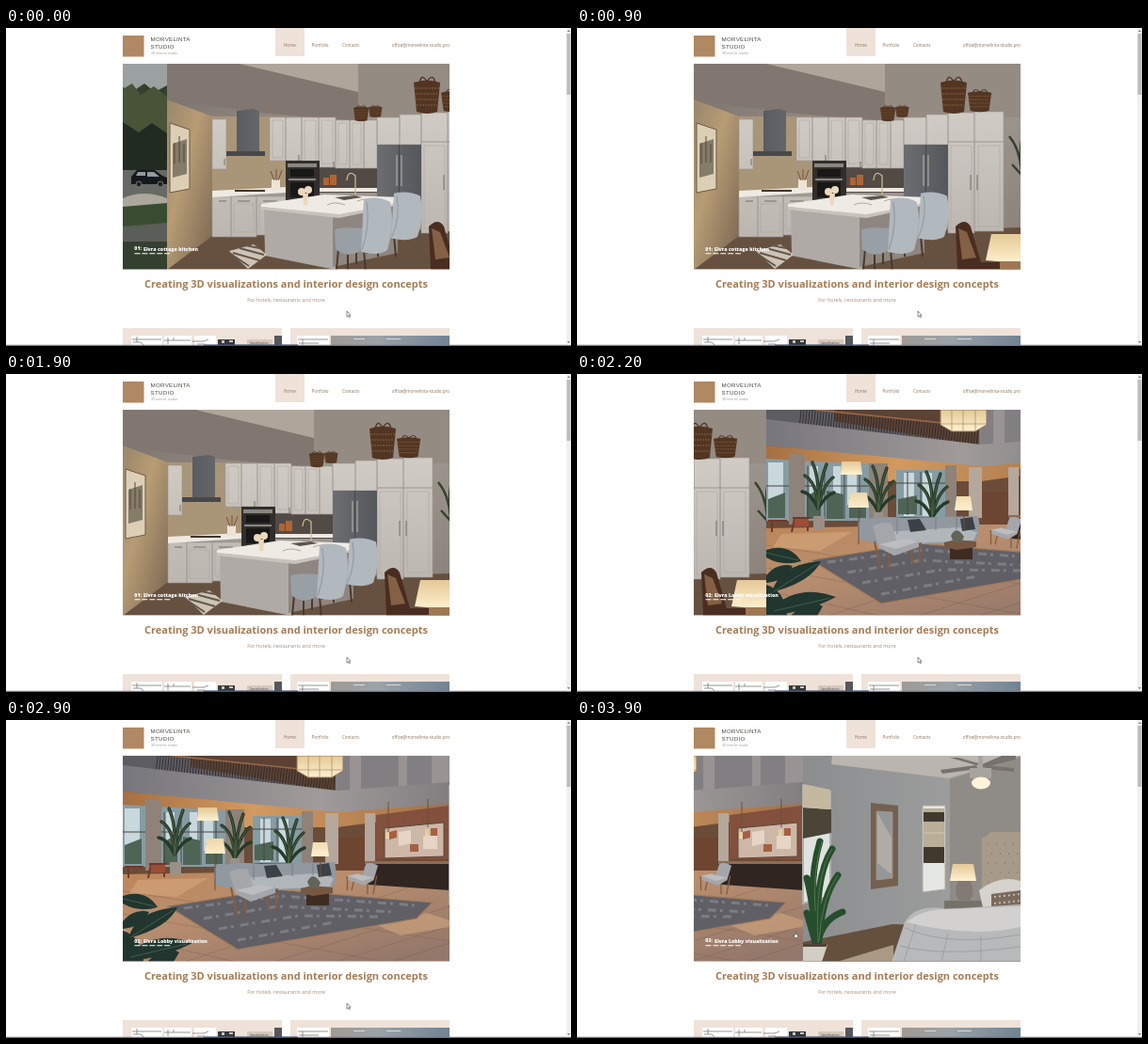
An HTML page for the animation above (4000 ms loop, 600 px wide and 338 px high).

```html
<!DOCTYPE html>
<html lang="en">
<head>
<meta charset="utf-8">
<title>Interior studio page</title>
<style>
  html, body { margin: 0; width: 100%; height: 100%; overflow: hidden; background: #fff; }
  svg { display: block; width: 100vw; height: 100vh; }
  text { font-family: "Open Sans", sans-serif; }
  .nav { font-size: 4.5px; fill: #8b735c; }
  .brand text { font: 6.2px "Liberation Sans", sans-serif; letter-spacing: .25px; fill: #4d4845; }
  .label { font-size: 5.3px; font-weight: 800; fill: #fff; }
</style>
</head>
<body>
<svg viewBox="0 0 600 338" preserveAspectRatio="none">
  <defs>
    <clipPath id="frame"><rect x="124" y="38" width="347" height="218.5"/></clipPath>
    <linearGradient id="wall" x2="1" y2="1"><stop stop-color="#756d67"/><stop offset=".5" stop-color="#a29b94"/><stop offset="1" stop-color="#867d75"/></linearGradient>
    <linearGradient id="warm" x2="1" y2="1"><stop stop-color="#9a866b"/><stop offset=".4" stop-color="#b79c74"/><stop offset="1" stop-color="#756350"/></linearGradient>
    <linearGradient id="cab" x2="0" y2="1"><stop stop-color="#d0cbc5"/><stop offset="1" stop-color="#bcb6b0"/></linearGradient>
    <linearGradient id="steel"><stop stop-color="#595c60"/><stop offset=".5" stop-color="#858789"/><stop offset="1" stop-color="#54575b"/></linearGradient>
    <linearGradient id="floor" x2=".8" y2="1"><stop stop-color="#bd8556"/><stop offset=".4" stop-color="#b98e6e"/><stop offset="1" stop-color="#94786b"/></linearGradient>
    <linearGradient id="fascia"><stop stop-color="#77767c"/><stop offset=".6" stop-color="#a09b9a"/><stop offset="1" stop-color="#827e80"/></linearGradient>
    <linearGradient id="soffit"><stop stop-color="#a66f42"/><stop offset=".4" stop-color="#d29a60"/><stop offset="1" stop-color="#a37048"/></linearGradient>
    <linearGradient id="paint"><stop stop-color="#8b8d8f"/><stop offset=".6" stop-color="#a2a2a1"/><stop offset="1" stop-color="#858380"/></linearGradient>
    <linearGradient id="glow" x2="0" y2="1"><stop stop-color="#e4c897"/><stop offset="1" stop-color="#fff1cf"/></linearGradient>
    <linearGradient id="ceil"><stop stop-color="#a09a94"/><stop offset=".4" stop-color="#9ba2a8"/><stop offset="1" stop-color="#718392"/></linearGradient>
    <g id="palm" fill="none" stroke="#263a2a" stroke-width="3.4" stroke-linecap="round">
      <path d="M0 42Q-1 15-14 7M0 42Q2 10-6-7M0 42Q2 12 9-5M0 42Q5 17 16 9M0 42Q-8 25-17 24M0 42Q9 27 17 25"/>
      <path stroke="#4d6040" stroke-width="1" d="M0 42Q-1 15-14 7M0 42Q2 10-6-7M0 42Q2 12 9-5M0 42Q5 17 16 9"/>
    </g>
    <g id="stool">
      <path stroke="#4d3827" stroke-width="2" d="M4 54L2 76M31 54L33 80M14 60V80M23 57V70"/>
      <path fill="#989fa5" d="M0 34Q4 30 30 32L31 54Q14 65 1 54Z"/>
      <path fill="#b1b8be" d="M31 1Q46-3 59 4Q64 29 56 55Q47 62 28 57Z"/>
      <path fill="none" stroke="#8c959d" d="M34 4Q38 30 29 55"/>
    </g>
    <g id="basket"><path fill="#523522" d="M0 6Q14 1 28 6L25 37Q14 41 3 37Z"/><path fill="none" stroke="#876141" stroke-dasharray="2 1" d="M1 12H27M2 18H26M2 24H26M3 30H25"/><path fill="none" stroke="#50331f" stroke-width="1.3" d="M6 7Q8-5 14 5Q21-5 23 7"/></g>
    <g id="seat"><path fill="none" stroke="#855c3c" stroke-width="2" d="M2 20L8 49M17 31L17 49M50 24V43M38 23L43 43M6 18L14 30L52 22"/><path fill="#a4a6aa" d="M0 4Q9-2 20 1L26 22L49 19V26L23 35L7 27Z"/><path fill="#bbbdc0" d="M7 23L33 17L49 20L25 28Z"/></g>
    <g id="fan" fill="#77726d"><path d="M426 52L388 57L386 53L424 48ZM430 51L466 42V38H451L428 48ZM424 48L396 40H405L430 47ZM433 52L464 55V51L434 48Z"/><path fill="#a7a39f" d="M426 38h5v13h-5zM417 51h23v11h-23z"/><ellipse cx="429" cy="67" rx="10" ry="6.5" fill="#fff4d9"/></g>
  </defs>
  <rect width="600" height="338" fill="#fff"/>

  <rect x="124" y="8" width="22.5" height="22.5" fill="#b08861"/>
  <g class="brand"><text x="153.6" y="14">MORVELINTA</text><text x="153.6" y="22">STUDIO</text></g>
  <text x="154" y="28.2" font-size="3.4" fill="#9a938c">3D interior studio</text>
  <rect x="286" width="31" height="30" fill="#efe2d9"/>
  <g class="nav">
    <text x="295" y="20.3">Home</text><text x="324.5" y="20.3">Portfolio</text><text x="357" y="20.3">Contacts</text>
    <text x="471" y="20.3" text-anchor="end">office@morvelinta-studio.pro</text>
  </g>

  <g clip-path="url(#frame)">
    <g id="track">
      <g transform="translate(-47)">
        <path fill="#34402f" d="M-176 38h347v219h-347z"/>
        <path fill="#9ba0a0" d="M124 38h47v23l-13 7-11-9-12 8-11-4z"/>
        <path fill="#485337" d="M124 65l10-6 9 12 14-9 14 11v70h-47z"/>
        <path fill="#222b22" d="M124 100l17 11 14-10 16 11v47h-47z"/>
        <path fill="#666964" d="M124 151h47v42h-47z"/>
        <path fill="#16191c" d="M133 158l6-7h19l8 6 5 2v7h-38z"/>
        <path fill="#929aa0" d="M140 153h8v4h-10zm10 0h7l6 5h-13z"/>
        <g fill="#202225" stroke="#777" stroke-width="1"><circle cx="141" cy="166" r="3"/><circle cx="164" cy="166" r="3"/></g>
        <path fill="#aba79a" d="M124 181q22-10 47 0v12h-47z"/><path fill="#384c32" d="M124 190l47-4v25l-47 7z"/><path fill="#5b5d58" d="M124 211l47-4v20h-47z"/>
      </g>

      <g clip-path="url(#frame)">
        <path fill="url(#wall)" d="M124 38h347v219H124z"/>
        <path fill="#817770" d="M124 38h77l126 29v32l-95-8-108-14z"/>
        <path fill="#afa59a" d="M201 38h126v30z"/><path fill="#948b83" d="M327 38h144v57H327z"/>
        <path fill="url(#warm)" d="M124 76l48 18v140l-48 23z"/>
        <path fill="#665140" d="M124 257l48-36 299-9v45z"/>
        <path fill="#dccfb6" stroke="#6b5946" d="M127 101l21 7v63l-21 4z"/><path fill="#857b69" d="M130 123l15-5v37l-15 4z"/><path stroke="#50483b" d="M132 144v-22m5 21v-28m5 28v-20"/>
        <path fill="#a99578" d="M172 94h78v79h-78z"/><path fill="#514a45" d="M286 145h62v30h-62z"/>
        <path fill="url(#cab)" stroke="#9b9691" stroke-width=".6" d="M172 97h15v53h-15zM233 95h17v46h-17zM250 95h17v46h-17zM267 95h18v50h-18zM285 95h18v53h-18zM303 98h15v51h-15zM318 98h15v51h-15zM333 98h14v51h-14zM347 95h24v29h-24zM371 92h23v32h-23zM394 90h28v31h-28zM422 89h31v32h-31zM394 121h28v97h-28zM422 121h31v95h-31zM172 179h20v43h-20zM192 179h27v43h-27zM219 179h31v41h-31z"/>
        <path fill="none" stroke="#ada79f" stroke-width=".6" d="M236 98h11v40h-11zM270 98h12v44h-12zM288 98h12v46h-12zM306 101h9v44h-9zM321 101h9v44h-9zM397 125h22v88h-22zM426 125h23v86h-23zM195 187h21v30h-21zM222 187h25v28h-25z"/>
        <path stroke="#524d48" stroke-width=".7" d="M185 139v7m79-11v6m37 1v6m117 8v16m7-16v16M179 184h8m12 0h13m14 0h15"/>
        <path fill="url(#steel)" d="M198 88l17-2 7 2v44h-24zM347 124h47v69h-47z"/><path fill="#46484a" d="M187 131h41v5h-41zM370 124h1v66h-1z"/><path stroke="#bab9b6" d="M368 135v33m5-33v33"/>
        <path fill="#322e2c" d="M250 141h36v49h-36z"/><path fill="#8a8782" d="M252 144h31v4h-31zm1 16h29v2h-29z"/><path fill="#181818" d="M255 150h25v8h-25zm0 14h25v16h-25z"/>
        <path fill="#eee9e1" d="M172 173l78-4v6l-78 5zM286 170h61v4h-61z"/><path fill="#40362e" d="M196 172h32v2h-32z"/>
        <path fill="#eee4d6" d="M235 161h9v11h-9z"/><path stroke="#765438" d="M238 162l-4-10m6 10v-12m2 12l4-11"/><path fill="#af6534" d="M290 159h6v8h-6zm7-3h7v11h-7z"/>
        <g transform="translate(386 52)"><use href="#basket"/></g><g transform="translate(415 65) scale(.9 .62)"><use href="#basket"/></g><g transform="translate(322 82) scale(.58 .44)"><use href="#basket"/></g><g transform="translate(338 82) scale(.52 .33)"><use href="#basket"/></g>
        <path fill="#afaaa5" d="M227 190l76 10v57l-75-15z"/><path fill="#8e8680" d="M300 198l69-13v54l-69 15z"/>
        <path fill="#eeeae4" d="M224 187l67-10 84 3-3 6-65 13-83-9z"/><path fill="#c9c3bc" d="M224 190l83 8 65-12v2l-65 14-83-9z"/>
        <path fill="#5b554f" d="M302 180l22-2 7 2-19 3z"/><path fill="none" stroke="#cdb88f" stroke-width="1.3" d="M324 178v-21q-8-7-9 5"/>
        <g fill="#ebd8bd"><circle cx="267" cy="174" r="4"/><circle cx="274" cy="172" r="4"/><path d="M268 176h6l-1 12h-4z"/></g>
        <path fill="none" stroke="#b9a58b" d="M294 188q8-4 19 0m13-4q9-4 18 0"/>
        <path fill="#cec4b5" d="M190 237l26-7 14 11-20 15z"/><path stroke="#62574c" stroke-width="2" d="M194 239l28 8m-21-13l26 7m-20-10l15 3m-29 7l18 12"/>
        <g transform="translate(334 175) scale(1 .85)"><use href="#stool"/></g><g transform="translate(302 181)"><use href="#stool"/></g>
        <path fill="#4a2d20" d="M402 211q10-10 16 0l11 38h42v8h-67z"/><path fill="#846044" d="M405 213l9 4 10 27-15 2z"/>
        <path fill="url(#glow)" d="M440 219h31v31l-37-3z"/><path fill="#9f7852" d="M449 248h22v9h-22z"/>
        <path fill="none" stroke="#344330" stroke-width="2.5" d="M472 152q-2-24-13-37m13 38q-2-22 0-33m0 36l-10-11"/>
      </g>

      <g transform="translate(347)"><g clip-path="url(#frame)">
        <path fill="#6b4c38" d="M124 38h347v219H124z"/>
        <path fill="#5d5c63" d="M124 38h226v42L124 58z"/><path fill="#827f82" d="M350 38h121v48H350z"/><path fill="#999393" d="M365 38h12v42h-12zm52 0h9v42h-9zm35 0h19v38h-19z"/>
        <path fill="#5b4234" d="M196 38h154v38L196 50z"/>
        <path fill="none" stroke="#2b2727" stroke-width="17" stroke-dasharray=".8 2.2" d="M160 45L350 66"/><path fill="none" stroke="#9a6846" stroke-width="1.6" d="M176 38L350 56"/>
        <path fill="url(#fascia)" d="M124 48l228 27 119-9v25l-119 9-228-24z"/>
        <path fill="url(#soffit)" d="M124 76l228 22 119-9v9l-119 16H124z"/>
        <path fill="#869ca3" d="M124 90l109 6v60H124zM262 102h54v50h-54z"/><path fill="#c8d8dd" d="M170 98h9v54h-9zm25 0h8v54h-8zm15 1h10v40h-10zm60 6h11v46h-11zm20 0h10v46h-10zM126 94h16v54h-16z"/>
        <path fill="#4e6455" d="M167 130l15-9v33h-15zm21-6l18 4v26h-18zm24 7h18v22h-18zm-86 2l18-7v27h-18zm138 0l20-4v20h-20z"/>
        <path stroke="#494440" stroke-width="1" d="M168 98v56m18-56v56m21-56v56m16-56v56M124 119h109m29-3h54m-42-12v46m14-46v46"/>
        <path fill="#8e8279" d="M148 84l17 2v74h-17zM233 95h20v62h-20zM314 97h12v56h-12z"/><path fill="#b4a79b" d="M339 99h14v54h-14zm42 0h11v52h-11z"/>
        <path fill="#82503c" d="M393 101l78-10v57h-78z"/><path fill="none" stroke="#a46a51" stroke-width="34" stroke-dasharray=".6 3" opacity=".25" d="M394 121h77"/>
        <path fill="#cdb8a8" stroke="#59463a" d="M402 115l63-6v36l-63 2z"/><path fill="#a75f44" d="M407 119l8-2v8l-8 2zm22 13h9v8h-9zm22-17h7v8h-7z"/><path fill="#e6d5c5" d="M417 119l13-2v14l-13 3zm26 4h15v14h-15z"/>
        <path fill="url(#floor)" d="M124 164l347-6v99H124z"/>
        <path fill="none" stroke="#705445" stroke-width=".6" opacity=".5" d="M124 182l347 53M124 206l280 51M124 230l120 27M285 257l186-59M190 257l250-83M350 257l121-38M410 257l61-20"/>
        <path fill="#dcae82" opacity=".5" d="M140 170l75-2-34 20-50-4zM385 214l62-9 24 8v7l-52 9z"/>
        <path fill="#605f66" stroke="#a27a56" stroke-width="1.2" d="M172 198l112-18 169 14-17 17-190 33z"/><path fill="none" stroke="#7c7c83" stroke-width="3" stroke-dasharray="9 4 3 7" d="M189 200l103-13 143 10M210 211l78-13 125 6M226 222l85-14 85 1M246 234l102-19"/>
        <path fill="#302521" d="M378 152h93v29l-86-6z"/><path fill="#8f6c55" d="M376 150h95v3h-95z"/><path fill="#6d4531" d="M353 125h28v35h-28z"/>
        <use href="#palm" x="179" y="101"/><use href="#palm" x="243" y="105"/><use href="#palm" x="300" y="111"/><path fill="#9a9088" d="M174 151h12v15h-12zM238 147h10v10h-10z"/>
        <path fill="none" stroke="#71372d" stroke-width="2" d="M126 156h20m-16 0v12m22-15h19m-17 0l-3 15m17-15v14"/><path fill="#a04c35" d="M154 154h15v8h-15z"/>
        <path fill="#92989f" d="M221 157q19-7 50-4l78-2q4 18-3 27l-95 5-30-8z"/><path fill="#b1b6bb" d="M249 168l80-5 19 5-4 9-82 4-18-5z"/><path fill="#3c4047" d="M274 155l13-1 7 12-17 2zm56-1l13-2 3 13-14 2z"/><path fill="none" stroke="#777e84" d="M263 154v16m41-17v13m22-13v12"/>
        <use href="#seat" x="237" y="158"/><g transform="translate(395 152) scale(-.65 .68)"><use href="#seat"/></g>
        <path fill="#3e2b22" d="M319 183h24v14h-24z"/><path fill="#765740" d="M313 179l12-3 22 2v6l-21 3-13-3z"/><path fill="#626359" d="M320 172q6-12 14 1l-3 6h-8z"/>
        <path stroke="#66513f" d="M222 140v41m112-30v16m72-80v32m42-35v30"/><path fill="url(#glow)" d="M213 126h18l2 16h-22zM326 130h15l2 15h-19zM403 119h4v7h-4zm42-3h4v7h-4z"/>
        <path fill="url(#glow)" stroke="#977b57" d="M309 38h49v16l-12 7h-25l-12-7z"/><path stroke="#a38b65" stroke-width=".7" d="M321 38v23m12-23v23m13-23v23M309 53h49"/>
        <path fill="url(#glow)" d="M204 93h20l2 14h-23z"/>
        <path fill="#20362f" d="M124 187q24-8 37 12q-20 6-37-4zM130 232q8-30 52-33q-10 22-52 33zM124 214q12-14 28-10q-8 16-28 18zM128 250q30-28 70-13q-28 15-70 20zM124 224q20 6 22 33h-22zM150 257q20-20 34-10l-6 10z"/><path fill="none" stroke="#4a6a58" stroke-width=".8" d="M124 190l34 8m-26 33l46-29m-46 50l60-14"/>
      </g></g>

      <g transform="translate(578)">
        <path fill="url(#paint)" d="M240 38h347v219H240z"/>
        <path fill="#bab5ae" d="M271 38h200l-76 24-125-15z"/><path fill="#8f8c88" d="M396 63l75-24v218h-75z"/>
        <path fill="#dfe2df" stroke="#b1afab" stroke-width="2" d="M240 70l29 6v111l-29 8z"/><path fill="#4b4538" d="M240 93l30 2v25l-30 6z"/><path fill="#c4b99f" d="M240 68l29 6v21l-29-2z"/>
        <path fill="#e5e7e3" stroke="#ada89f" d="M367 91h24v89l-24 3z"/><path fill="#b9ae96" d="M368 94h22v42h-22z"/><path fill="#40392e" d="M368 98h22v10h-22zm0 37h22v17h-22z"/><path fill="#c6bba4" d="M369 119h21v2h-21z"/>
        <path fill="#736050" d="M312 88l29 3v85l-29 4z"/><path fill="#92979a" stroke="#b29a7e" stroke-width=".7" d="M318 97l17 1v70l-17 2z"/><path fill="#b0aca5" d="M319 99l15 26v39l-15-12z"/>
        <path fill="#65503d" d="M240 236l95-19 136 4v36H240z"/><path fill="#aa9a84" d="M276 257l60-18v18z"/>
        <path fill="#a79a88" d="M430 125q7-2 9-6h32v90h-41z"/><path fill="none" stroke="#84796b" stroke-width="1.5" stroke-dasharray="1 8" d="M436 132h35m-31 10h31m-35 10h35m-31 10h31m-35 10h35"/>
        <path fill="#77716c" d="M390 192h41v26h-41z"/><path stroke="#b6afa6" d="M391 201h37m-20 4h5"/><path fill="#827b74" d="M405 170h12q7 14-1 23h-10q-7-9-1-23z"/><path fill="url(#glow)" d="M399 153h22l3 18h-28z"/>
        <path fill="#d6d2cd" d="M427 181q22-17 44-10v34l-39-1z"/><path fill="#786a5d" d="M440 185l31-4v24l-31 2z"/><path stroke="#c7b9a4" stroke-width="2" stroke-dasharray="2 3" d="M443 188l28-3m-28 10l28-3m-28 10l28-3"/>
        <path fill="#b8b9ba" d="M334 257l14-42q12-20 44-14l79-5v61z"/><path fill="#d2d1cf" d="M350 215q17-15 47-14l74-3v22q-53 12-121-5z"/><path fill="none" stroke="#949699" stroke-width=".7" d="M348 221q47 21 123 7M360 217l-13 40m47-30l-7 30m42-28v28M343 240q43 12 128 1"/>
        <path fill="none" stroke="#264e2d" stroke-width="7" stroke-linecap="round" d="M255 238q-5-47-11-70m12 69q-4-70 15-100m-14 98q3-47 20-70m-21 72q4-25 26-33m-29 32q-7-24-9-31m7-2q-3-40 7-74"/><path fill="none" stroke="#52764a" d="M256 237q-4-70 15-100m-14 98q3-47 20-70m-24 38q-3-40 7-74"/>
        <path fill="#d3cec5" d="M240 239h26l-6 18h-20z"/><path fill="#514336" d="M240 238h25v3h-25z"/>
        <use href="#fan"/>
      </g>
    </g>
    <g class="label"><text id="num" x="136.3"></text><text id="title" x="146" y="236.5"></text></g>
    <path stroke="#fff" stroke-width="1.1" stroke-dasharray="6 1.9" d="M136.5 239.8h38"/>
  </g>

  <text x="297.5" y="276.3" text-anchor="middle" font-size="11" font-weight="700" fill="#a47c54">Creating 3D visualizations and interior design concepts</text>
  <text x="297.5" y="291.4" text-anchor="middle" font-size="5.4" fill="#a88b70">For hotels, restaurants and more</text>

  <path fill="#efe2d9" d="M124 319h169v19H124zM302 319h169v19H302z"/>
  <path fill="#fff" d="M133 327h33v11h-33zm35 0h29v11h-29zm32 0h23v11h-23zM309 327h34v11h-34z"/>
  <path fill="none" stroke="#6b6968" stroke-width=".7" d="M134 331h31m-30 3h8l3 3m-7-9v6m29-2h28m-24-3v7m6-7v3m20 1h12l5-2m-12 5h8M310 331h32m-31 4h21m-17-4v7"/>
  <path fill="#36383a" d="M225 331h18v6h-18z"/><path fill="#c8c5bf" d="M229 332h3v3h-3zm8 0h4v2h-4z"/>
  <path fill="#d7c8bd" d="M256 331h27v7h-27z"/><text x="259" y="335.5" font-size="3.3" fill="#4b4541">Specification</text><path fill="#55575b" d="M285 327h8v11h-8z"/>
  <path fill="url(#ceil)" d="M345 327h126v11H345z"/><path fill="#d8dad7" d="M369 330h12v1h-12zm35 0h15v1h-15z"/>
  <path fill="#6c788f" d="M0 336.7h600v1.3H0z"/><path fill="#3c516f" d="M210 336.5h100v1.5H210z"/>
  <path fill="#f0f0f0" d="M595 0h5v336.5h-5z"/><path fill="#bcbcbc" d="M595.5 6h4v65h-4z"/><path fill="#777" d="M596 4l1.5-2 1.5 2zm0 329l1.5 2 1.5-2z"/>
  <g id="cursor" fill="#fff" stroke="#444" stroke-width=".6"><path id="arrow" d="M0-2v6l1.4-1.2 1 2 1-.5-1-1.9H4z"/><path id="hand" d="M-.7 1v-3.8h1V-.3l2.2.5v2L1.7 3.5H-.5L-2 .6z"/></g>
</svg>
<script>
  const LOOP = 4000, STEP = 100;
  const $ = id => document.getElementById(id);
  const scroll = [[0, 47], [100, 18], [200, 5], [300, 0], [1900, 0], [2000, -36], [2100, -165], [2200, -270], [2300, -328],
    [2400, -347], [3600, -347], [3700, -372], [3800, -470], [3900, -578], [4000, -645]];
  const mouseX = [[0, 362], [3200, 362], [3600, 412], [3700, 402], [3800, 330], [3900, 232], [4000, 200]];
  const mouseY = [[0, 303], [3200, 303], [3600, 224], [3900, 228], [4000, 229]];

  function at(steps, t) {
    const i = steps.findIndex(s => s[0] > t);
    const [t0, a] = steps[i - 1], [t1, b] = steps[i];
    return a + (b - a) * (t - t0) / (t1 - t0);
  }

  function show(id, on) { $(id).style.display = on ? "" : "none"; }

  function draw(now) {
    const t = Math.floor(now % LOOP / STEP) * STEP;
    $("track").setAttribute("transform", `translate(${at(scroll, t)})`);
    $("cursor").setAttribute("transform", `translate(${at(mouseX, t)} ${at(mouseY, t)})`);
    $("num").textContent = t < 2000 ? "01:" : t < 3700 ? "02:" : "03:";
    $("num").setAttribute("y", t < 300 || t >= 3700 ? 235.7 : 236.5);
    $("title").textContent = t < 2000 ? "Elvra cottage kitchen" : "Elvra Lobby visualization";
    show("arrow", t < 3500);
    show("hand", t >= 3500);
    requestAnimationFrame(draw);
  }
  draw(performance.now());
</script>
</body>
</html>
```
